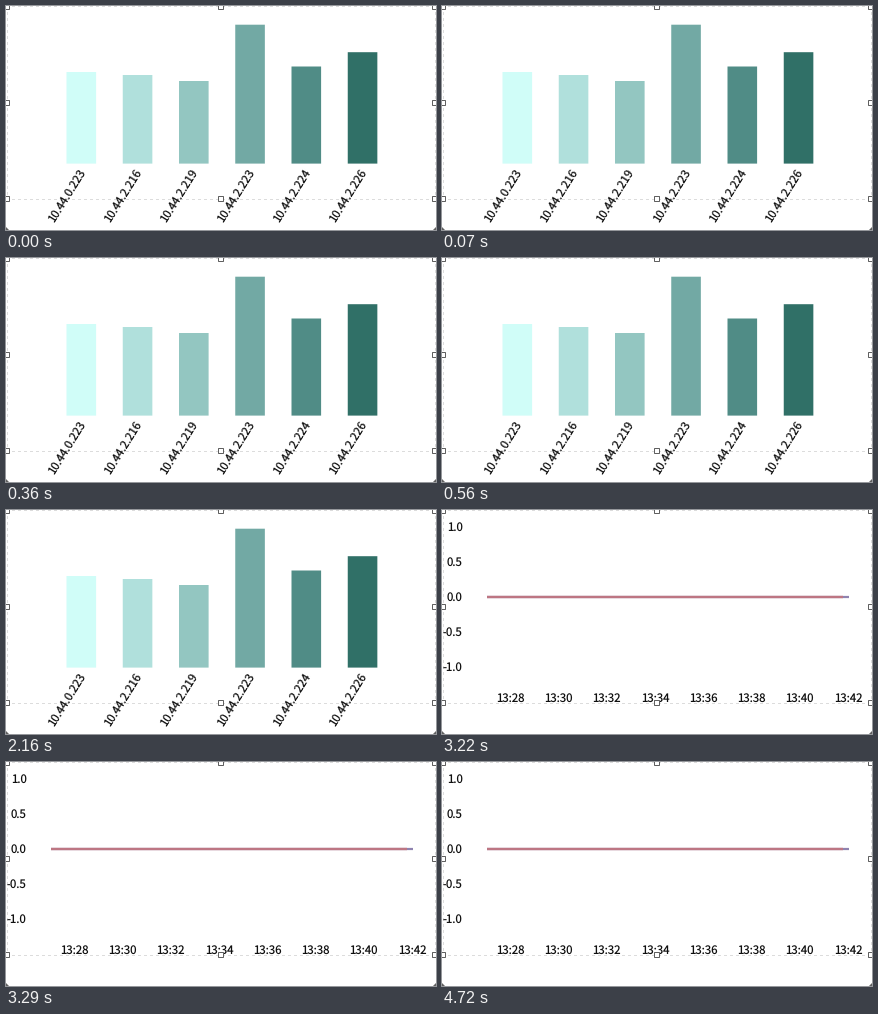
Write a matplotlib script that moves like this. It is 430 by 224 pixels and loops after 5.67 s.

```python
import math

import matplotlib.pyplot as plt
from matplotlib.animation import FuncAnimation
from matplotlib.patches import Polygon, Rectangle

WIDTH, HEIGHT, DPI = 430, 224, 100
STEP_MS, FRAMES = 70, 81
SWITCH_MS = 3220
FONT_PX = 11.4
HALF_DIGIT = 4.2  # from the middle of a digit down to its baseline
INK = "#101010"
GRID, HANDLE = "#dcdcdc", "#606060"

plt.rcParams["font.family"] = "Noto Sans CJK JP"
plt.rcParams["text.hinting"] = "none"
fig = plt.figure(figsize=(WIDTH / DPI, HEIGHT / DPI), dpi=DPI, facecolor="white")
ax = fig.add_axes([0, 0, 1, 1])
ax.set_xlim(0, WIDTH)
ax.set_ylim(HEIGHT, 0)
ax.axis("off")


def px(size):
    return size * 72 / DPI


def label(text, x, y, align="center", angle=0):
    """Place text with the middle of its digits at height y."""
    turn = math.radians(angle)
    return ax.text(x + HALF_DIGIT * math.sin(turn), y + HALF_DIGIT * math.cos(turn),
                   text, size=px(FONT_PX), color=INK, ha=align, va="baseline",
                   rotation=angle, rotation_mode="anchor", zorder=3)


def stroke(xs, ys, color, width, **style):
    return ax.plot(xs, ys, color=color, lw=px(width), snap=False,
                   solid_capstyle="butt", **style)[0]


def box(left, top, width, height, **style):
    return ax.add_patch(Rectangle((left, top), width, height, snap=False, **style))


def bar_chart():
    bars = [("10.44.0.223", 66, "#d0fdf8"), ("10.44.2.216", 69, "#b0e0dc"),
            ("10.44.2.219", 75, "#93c6c1"), ("10.44.2.223", 18.7, "#72a9a4"),
            ("10.44.2.224", 60.5, "#508c86"), ("10.44.2.226", 46.2, "#307067")]
    parts = []
    for i, (host, top, color) in enumerate(bars):
        left = 60.5 + 56.25 * i
        parts.append(box(left, top, 29.6, 157.6 - top, fc=color, lw=0, zorder=2))
        parts.append(label(host, left - 0.2, 189, angle=58))
    return parts


def line_chart():
    parts = [label(f"{1 - 0.5 * i:.1f}", 20.5, 17 + 35 * i, "right") for i in range(5)]
    parts += [label(f"13:{28 + 2 * i}", 68.3 + 48.25 * i, 188) for i in range(8)]
    parts.append(stroke([45, 407], [87, 87], "#8f83b0", 2.2, zorder=2))
    parts.append(stroke([45, 401], [87, 87], "#bd7683", 2.4, zorder=2))
    return parts


def selection_frame():
    dashes = dict(dashes=(3, 3), zorder=1)
    for y in (0.5, 193.5):
        stroke([0, WIDTH], [y, y], GRID, 1, **dashes)
    for x in (1.5, 429.5):
        stroke([x, x], [0, 193], GRID, 1, **dashes)
    for x in (1, 215, 429):
        for y in (1, 97, 193):
            if (x, y) != (215, 97):
                box(x - 2.5, y - 2.5, 5, 5, fc="white", ec=HANDLE, lw=px(1), zorder=4)
    for x, inward in ((0, 1), (WIDTH, -1)):
        ax.add_patch(Polygon([(x, HEIGHT), (x + 3 * inward, HEIGHT), (x, HEIGHT - 3)],
                             fc=HANDLE, lw=0, zorder=4))


selection_frame()
bar_parts, line_parts = bar_chart(), line_chart()


def draw(frame):
    show_line = frame * STEP_MS >= SWITCH_MS
    for part in bar_parts:
        part.set_visible(not show_line)
    for part in line_parts:
        part.set_visible(show_line)
    return bar_parts + line_parts


animation = FuncAnimation(fig, draw, frames=FRAMES, interval=STEP_MS,
                          init_func=lambda: draw(0), repeat=True, repeat_delay=0)
plt.show()
```
